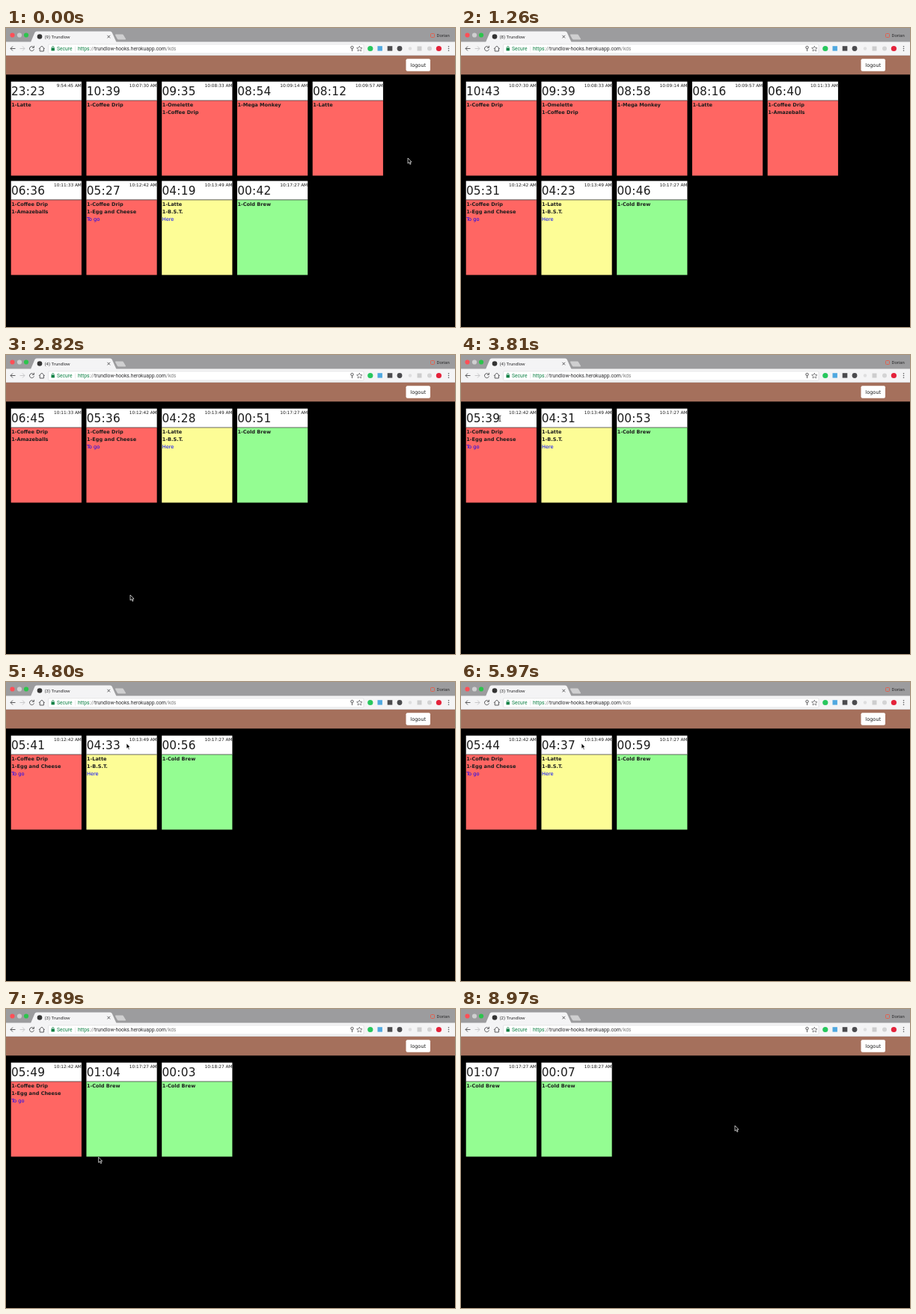
An HTML page for the animation above (9.09 s loop, 600x400 px).

```html
<!DOCTYPE html>
<html lang="en">
<head>
<meta charset="utf-8">
<title>Order board</title>
<style>
html, body { margin: 0; width: 100%; height: 100%; overflow: hidden; background: #000; }
svg { display: block; width: 100vw; height: 100vh; }
text { white-space: pre; }
.ui { font-family: Roboto, "Liberation Sans", sans-serif; fill: #2c2c2e; }
.page { font-family: "DejaVu Sans", sans-serif; fill: #1c1c1c; }
.timer { font-size: 15.3px; letter-spacing: .25px; }
.stamp { font-size: 5.8px; text-anchor: end; }
.item { font-size: 6.55px; font-weight: bold; }
.note { font-size: 6.6px; fill: #00f; }
.line { fill: none; stroke: #5a5a5c; stroke-width: 1; }
</style>
</head>
<body>
<svg viewBox="0 0 600 400" preserveAspectRatio="none">
  <rect width="600" height="400" fill="#000"/>

  <!-- tab strip -->
  <rect width="600" height="19" fill="#9c9c9e"/>
  <circle cx="8.5" cy="9.5" r="3.1" fill="#ff4f57"/>
  <circle cx="18" cy="9.5" r="3.1" fill="#cfcfd0"/>
  <circle cx="27" cy="9.5" r="3.1" fill="#2cc44c"/>
  <path d="M33 19 L38.5 6 Q39.2 4.5 41 4.5 H139 Q141 4.5 141.7 6 L147.5 19 Z" fill="#f4f4f5"/>
  <path d="M146 9.5 q-.5-1 .8-1 h8.7 q1 0 1.5 1 l3 5 q.4 1-.8 1 h-9 q-1 0-1.5-1 Z" fill="#cfcfd0"/>
  <circle cx="45" cy="11.5" r="3.3" fill="#333"/>
  <text id="tab" class="ui" x="51.5" y="13.7" font-size="6.1"></text>
  <path class="line" d="M135.5 9.8 l3.6 3.6 m0-3.6 l-3.6 3.6" stroke-width=".9"/>
  <rect x="567.5" y="7.5" width="5" height="5" rx="1" fill="none" stroke="#e0604f"/>
  <text class="ui" x="575.5" y="12" font-size="6">Dorian</text>

  <!-- toolbar -->
  <rect y="18.5" width="600" height="18.5" fill="#f4f4f5"/>
  <rect y="36.3" width="600" height=".7" fill="#c4bfbd"/>
  <path class="line" d="M12.5 27.5 H6 m3-3 l-3 3 l3 3"/>
  <path class="line" d="M18.5 27.5 H25 m-3-3 l3 3 l-3 3" style="stroke:#c8c8ca"/>
  <path class="line" d="M36.7 25.6 A3 3 0 1 0 37.4 28.4 M37.4 23.8 v2.5 h-2.5"/>
  <path class="line" d="M44 27.8 L47.8 24 L51.6 27.8 M45.2 27 V31 H50.4 V27"/>
  <rect x="56.5" y="21.8" width="421.5" height="12.2" rx="1.5" fill="#fff" stroke="#d6d6d8" stroke-width=".6"/>
  <rect x="60.5" y="26.7" width="4.4" height="3.7" fill="#0b8043"/>
  <path d="M61.5 27 v-1.3 a1.2 1.2 0 0 1 2.4 0 V27" fill="none" stroke="#0b8043" stroke-width=".8"/>
  <text class="ui" x="68" y="29.7" font-size="6.7" style="fill:#0b8043">Secure</text>
  <rect x="92" y="24.5" width=".5" height="7" fill="#d6d6d8"/>
  <text class="ui" x="96" y="29.7" font-size="6.8"><tspan fill="#0b8043">https</tspan><tspan fill="#808080">://</tspan>trundlow-hooks.herokuapp.com<tspan fill="#808080">/kds</tspan></text>
  <circle cx="462.5" cy="26" r="1.7" fill="none" stroke="#5a5a5c"/>
  <path class="line" d="M462.5 27.7 v3.4"/>
  <path class="line" d="M472.3 24.1 l1.1 2.4 2.6.2 -2 1.7 .6 2.6 -2.3-1.4 -2.3 1.4 .6-2.6 -2-1.7 2.6-.2 Z" style="stroke-width:.7"/>
  <circle cx="486.8" cy="27.5" r="3.6" fill="#27c75d"/>
  <rect x="496.5" y="24.2" width="6.4" height="6.4" fill="#4fa8e0"/>
  <rect x="509.7" y="24.2" width="6.6" height="6.4" fill="#4b4b4e"/>
  <circle cx="526" cy="27.5" r="3.4" fill="#4b4b4e"/>
  <circle cx="540" cy="27.5" r="2.2" fill="#dededf"/>
  <rect x="549.5" y="24.5" width="6" height="6" fill="#cdcdce"/>
  <circle cx="566" cy="27.5" r="3" fill="#d3d3d4"/>
  <circle cx="578.4" cy="27.5" r="3.6" fill="#e4223a"/>
  <g fill="#5a5a5c"><circle cx="591.5" cy="24.7" r=".8"/><circle cx="591.5" cy="27.5" r=".8"/><circle cx="591.5" cy="30.3" r=".8"/></g>

  <!-- page header -->
  <rect y="37" width="600" height="25.3" fill="#a5705c"/>
  <rect x="534.5" y="41.2" width="32.5" height="16.6" rx="2" fill="#fff"/>
  <text class="page" x="540.3" y="52" font-size="6.6">logout</text>

  <g id="board"></g>
  <path id="arrow" d="M0 0 V7.2 L1.7 5.7 L2.9 8.4 L4.1 7.9 L2.9 5.2 H5 Z" fill="#000" stroke="#fff" stroke-width=".7"/>
  <path id="beam" d="M-1.5-4 Q0-4 0-3 Q0-4 1.5-4 M0-3 V3 M-1.5 4 Q0 4 0 3 Q0 4 1.5 4" fill="none" stroke="#1c1c1c" stroke-width=".8"/>
</svg>
<script>
const LOOP = 9090, TITLE_LAG = 120;
const RED = '#ff6663', YELLOW = '#fdfd96', GREEN = '#94fd92';
const $ = id => document.getElementById(id);

// base: seconds on the timer at the start; phase: fraction of a second already passed
const card = (stamp, base, phase, color, items, note = '', gone = Infinity, born = 0) =>
  ({ stamp, base, phase, color, items, note, gone, born });
const ms = (m, s) => m * 60 + s;

const cards = [
  card('9:54:45 AM', ms(23, 23), .5, RED, ['1-Latte'], '', 1080),
  card('10:07:30 AM', ms(10, 39), .5, RED, ['1-Coffee Drip'], '', 1410),
  card('10:08:33 AM', ms(9, 35), .8, RED, ['1-Omelette', '1-Coffee Drip'], '', 1710),
  card('10:09:14 AM', ms(8, 54), .8, RED, ['1-Mega Monkey'], '', 2130),
  card('10:09:57 AM', ms(8, 12), .5, RED, ['1-Latte'], '', 2490),
  card('10:11:33 AM', ms(6, 36), .6, RED, ['1-Coffee Drip', '1-Amazeballs'], '', 3810),
  card('10:12:42 AM', ms(5, 27), .65, RED, ['1-Coffee Drip', '1-Egg and Cheese'], 'To go', 8520),
  card('10:13:49 AM', ms(4, 19), .9, YELLOW, ['1-Latte', '1-B.S.T.'], 'Here', 6060),
  card('10:17:27 AM', 42, .57, GREEN, ['1-Cold Brew']),
  card('10:18:27 AM', -19, .605, GREEN, ['1-Cold Brew'], '', Infinity, 6540)
];

// [time, seconds passed on the board]
const clock = [[0, 0], [1710, 5.15], [2820, 8.45], [3810, 11.4], [5970, 17.2],
  [6690, 19.2], [6870, 19.33], [8970, 25.4], [LOOP, 25.4]];

// [time, x, y]
const path = [[0, 537, 174], [240, 548, 48], [600, 300, 322], [930, 45, 85], [990, 29, 85],
  [2500, 29, 85], [2800, 166, 321], [3000, 166, 321], [3720, 52, 85], [3840, 52, 85],
  [4650, 161, 82], [6870, 161, 82], [7500, 150, 230], [7700, 150, 226], [8300, 40, 110],
  [8520, 40, 110], [8640, 230, 272], [8820, 366, 156], [LOOP, 366, 156]];

const smooth = p => p * p * (3 - 2 * p);

function sample(keys, t, ease = p => p) {
  const i = Math.max(1, keys.findIndex(k => k[0] >= t));
  const a = keys[i - 1], b = keys[i];
  const p = ease((t - a[0]) / (b[0] - a[0]));
  return a.slice(1).map((v, j) => v + (b[j + 1] - v) * p);
}

const slot = i => [6.7 + 100.75 * (i % 5), 71.7 + 132.9 * Math.floor(i / 5)];
const alive = t => cards.filter(c => t >= c.born && t < c.gone);
const two = n => String(n).padStart(2, '0');

function build(c) {
  const lines = c.items.map((s, i) =>
    `<text class="page item" x=".5" y="${33.3 + i * 10}">${s}</text>`).join('');
  const note = `<text class="page note" x=".5" y="${33.3 + c.items.length * 10}">${c.note}</text>`;
  c.node = document.createElementNS('http://www.w3.org/2000/svg', 'g');
  c.node.innerHTML = `<rect width="94.2" height="25.3" fill="#fff"/>
    <rect y="25.3" width="94.2" height="100.5" fill="${c.color}"/>
    <rect y="24.9" width="94.2" height=".8" fill="#444"/>
    <text class="page timer" x=".2" y="18.2"></text>
    <text class="page stamp" x="94.2" y="7.3">${c.stamp}</text>${lines}${note}`;
  c.timer = c.node.querySelector('.timer');
  $('board').append(c.node);
}

function place(node, x, y, shown) {
  node.setAttribute('transform', `translate(${x} ${y})`);
  node.style.display = shown ? '' : 'none';
}

function draw(t) {
  const [passed] = sample(clock, t);
  const shown = alive(t);
  for (const c of cards) {
    const i = shown.indexOf(c);
    place(c.node, ...slot(Math.max(i, 0)), i >= 0);
    const s = Math.max(0, c.base + Math.floor(passed + c.phase));
    c.timer.textContent = two(Math.floor(s / 60)) + ':' + two(s % 60);
  }
  $('tab').textContent = `(${alive(Math.max(0, t - TITLE_LAG)).length}) Trundlow`;

  const [x, y] = sample(path, t, smooth);
  const overText = shown.some((c, i) => {
    const [sx, sy] = slot(i);
    return x >= sx && x < sx + 46 && y > sy + 3 && y < sy + 22;
  });
  place($('arrow'), x, y, !overText);
  place($('beam'), x, y, overText);
}

cards.forEach(build);
const start = performance.now();
function frame() {
  draw((performance.now() - start) % LOOP);
  requestAnimationFrame(frame);
}
frame();
</script>
</body>
</html>
```
